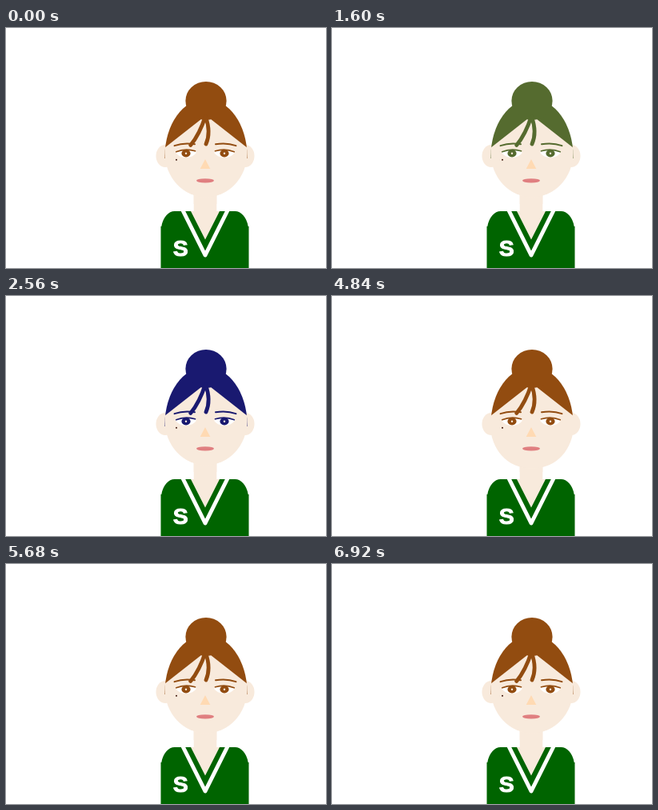
An HTML page for the animation above (8000 ms loop, 400x300 px).

```html
<!DOCTYPE html>
<html lang="en">
<head>
<meta charset="utf-8">
<title>Character styles</title>
<style>
html, body { margin: 0; width: 100%; height: 100%; overflow: hidden; background: #fff; }
svg { display: block; width: 100vw; height: 100vh; }
.skin { fill: #f8eadc; }
.hair { fill: var(--hair); }
.line { fill: none; stroke: var(--hair); stroke-linecap: round; }
</style>
</head>
<body>
<svg id="stage" viewBox="0 0 400 300">
  <defs>
    <g id="eye">
      <path d="M-13 -1Q0 -9 13 -1Q9 5 0 5Q-9 5 -13 -1Z" fill="#fff"/>
      <ellipse class="hair" rx="5.6" ry="4.7"/>
      <circle r="1.2" fill="#f8eadc"/>
      <path class="line" d="M-12.3 -2Q-1 -6.6 11.5 -3" stroke-width="1.6"/>
    </g>
    <g id="lid">
      <ellipse class="skin" cy="-3.2" rx="13" ry="8.5"/>
      <path class="line" d="M-11.5 1Q0 6 11.5 1" stroke-width="1.6"/>
    </g>
  </defs>

  <ellipse class="skin" cx="199" cy="160" rx="11.5" ry="14"/>
  <ellipse class="skin" cx="299" cy="160" rx="11.5" ry="14"/>

  <path fill="#006400" d="M193.5 300V248H194.3A17 25 0 0 1 211 229H286A17 25 0 0 1 302.7 248H303.5V300Z"/>
  <path class="skin" d="M234.5 200H263.5V229H267L249 264.5L231 229H234.5Z"/>
  <path d="M220.5 227L249 284L277.5 227" fill="none" stroke="#fff" stroke-width="5" stroke-linejoin="round"/>
  <path class="skin" d="M216 224H282V229H216Z" visibility="hidden"/>
  <path fill="#fff" d="M210 220H234.5V229H210ZM263.5 220H288V229H263.5Z"/>
  <text x="208.7" y="285.3" font-family="'Liberation Sans', Arial, sans-serif" font-weight="700" font-size="28.5" fill="#fff" stroke="#fff">S</text>

  <path class="hair" d="M198.5 163V160A51.5 71.5 0 0 1 301.5 160V163Z"/>
  <path id="face" class="skin"/>
  <ellipse class="hair" cx="250" cy="91" rx="25.6" ry="24"/>
  <path class="line" d="M249.3 110Q242 133 230.7 146.5" stroke-width="4.8"/>
  <path class="line" d="M249.5 111Q256.5 130 250 145" stroke-width="4.8"/>

  <g id="eyes">
    <use href="#eye" x="225" y="156.7"/>
    <use href="#eye" transform="translate(273 156.7) scale(-1 1)"/>
  </g>
  <g id="lids">
    <use href="#lid" x="225" y="156.7"/>
    <use href="#lid" x="273" y="156.7"/>
  </g>
  <path class="line" d="M210.5 147.2Q222 143 236 145.3M262 145.3Q276 143 287.5 147.2" stroke-width="1.9"/>

  <circle cx="213" cy="164.7" r="1" fill="#3a1408"/>
  <path fill="#ffdab3" d="M249 164L255.3 176H242.7Z"/>
  <path fill="#e07f80" d="M238 190.8Q238 188.3 249 188.3Q260 188.3 260 190.8Q259 193.4 249 193.4Q239 193.4 238 190.8Z"/>
</svg>
<script>
const LOOP = 8000;
const BROWN = '#924c10';
const HAIR = [[3620, BROWN], [2560, '#191970'], [1600, '#556b2f'], [820, '#8b0000'], [0, BROWN]];
const HAIRLINE = 'M198.7 149.5L250 109.3L301.3 149.5';
const OVAL = `${HAIRLINE}L301.5 156A51.5 55.5 0 0 1 198.5 156Z`;
const WIDE = `${HAIRLINE}Q303 153 302.5 161C301 191 282 215.5 250 215.5C218 215.5 199 191 197.5 161Q197 153 198.7 149.5Z`;

const el = id => document.getElementById(id);
const stage = el('stage'), face = el('face'), eyes = el('eyes'), lids = el('lids');
const within = (t, from, to) => t >= from && t < to;
const show = (node, on) => node.setAttribute('visibility', on ? 'visible' : 'hidden');

function draw(t) {
  const blink = within(t, 6640, 6920);
  stage.style.setProperty('--hair', HAIR.find(([from]) => t >= from)[1]);
  face.setAttribute('d', within(t, 4840, 5680) ? WIDE : OVAL);
  show(eyes, !blink);
  show(lids, blink);
}

const start = performance.now();
function tick() {
  draw((performance.now() - start) % LOOP);
  requestAnimationFrame(tick);
}
tick();
</script>
</body>
</html>
```
